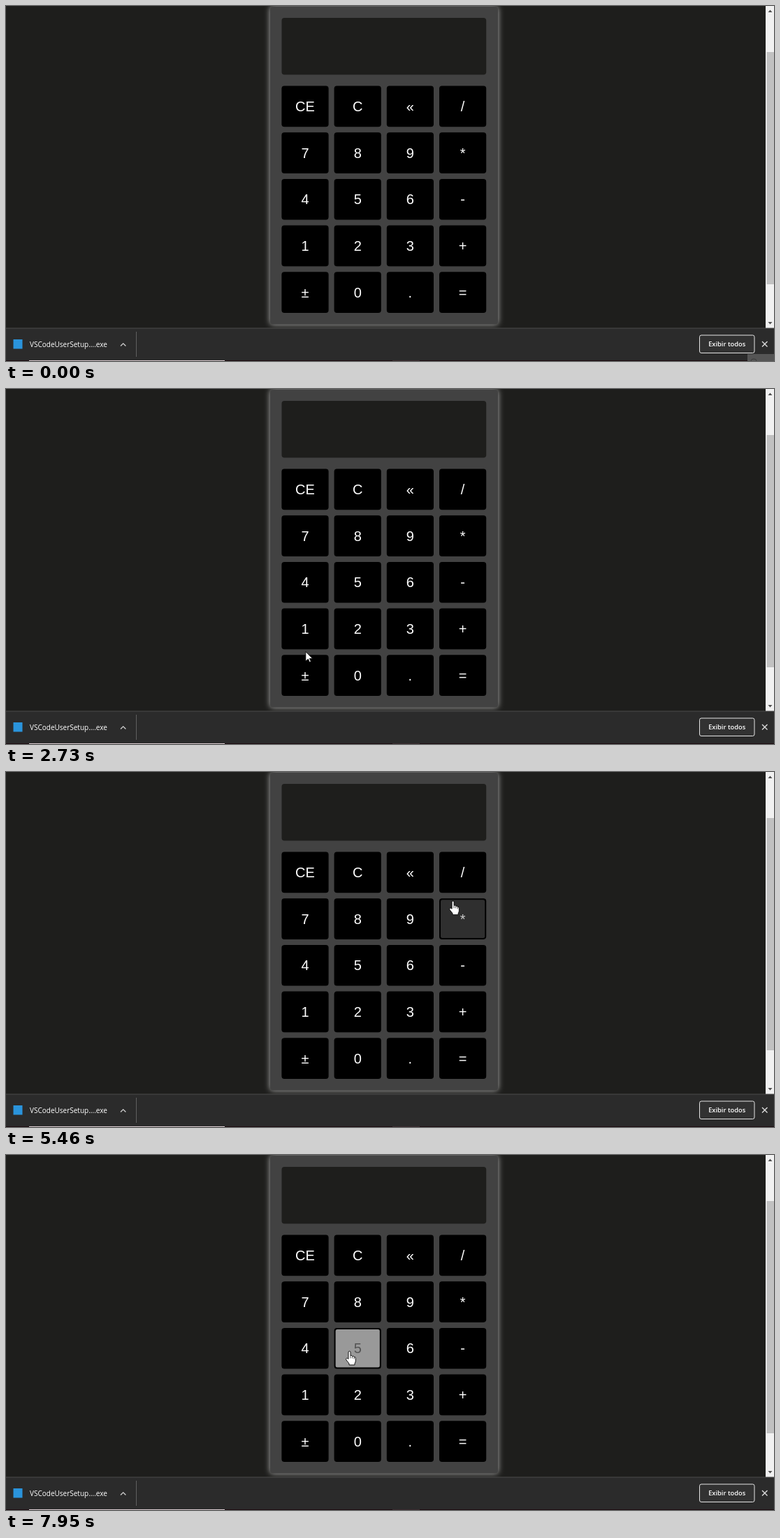
An HTML page that plays this animation: 1099x509 px, repeating every 8000 ms.

```html
<!DOCTYPE html>
<html lang="pt">
<head>
<meta charset="utf-8">
<title>Calculadora</title>
<style>
html, body { margin: 0; width: 100%; height: 100%; overflow: hidden; background: #1e1e1c; }
svg { display: block; width: 1099px; height: 509px; }
.key { font: 20px "Liberation Sans", Arial, sans-serif; text-anchor: middle; }
.ui { font-family: "Open Sans", "Noto Sans", sans-serif; fill: #fff; }
</style>
</head>
<body>
<svg id="stage" viewBox="0 0 1099 509">
  <defs>
    <filter id="glow" x="-10%" y="-10%" width="120%" height="120%"><feGaussianBlur stdDeviation="4.2"/></filter>
  </defs>
  <rect width="1099" height="509" fill="#1e1e1c"/>
  <rect x="378" y="1" width="326" height="455.5" rx="4" fill="#b4b4b4" filter="url(#glow)"/>
  <rect x="378" y="1" width="326" height="455.5" rx="4" fill="#424242"/>
  <rect x="394.5" y="17" width="292.7" height="81.5" rx="4" fill="#1e1e1c"/>
  <g id="keys"></g>

  <rect x="1087" width="12" height="462" fill="#f1f1f1"/>
  <rect x="1088.5" y="66" width="10.5" height="333" fill="#c1c1c1"/>
  <path d="M1090.5 9l3-3.5 3 3.5zM1090.5 453l3 3.5 3-3.5z" fill="#505050"/>

  <rect y="462" width="1099" height="47" fill="#2b2b2b"/>
  <rect y="461.5" width="1099" height="1" fill="#4d4d4d"/>
  <rect x="10.5" y="478" width="13" height="13.5" fill="#2a94dc"/>
  <text class="ui" x="34" y="489" font-size="10">VSCodeUserSetup....exe</text>
  <path d="M164 487.5l3.7-3.7 3.7 3.7" fill="none" stroke="#d0d0d0" stroke-width="1.3"/>
  <rect x="186" y="467" width="1" height="36" fill="#606060"/>
  <rect x="992.5" y="472" width="78.5" height="25.5" rx="2.5" fill="#323232" stroke="#e4e4e4"/>
  <text class="ui" x="1031.7" y="488" font-size="9.3" font-weight="600" text-anchor="middle">Exibir todos</text>
  <path d="M1082 481l7.5 7.5m0-7.5l-7.5 7.5" stroke="#dcdcdc" stroke-width="1.4"/>
  <rect y="508" width="1099" height="1" fill="#1c0b10"/>
  <rect x="33" y="508" width="280" height="1" fill="#dccdd2"/>
  <rect x="553" y="508" width="39" height="1" fill="#3a2a2e"/>
  <g id="tip">
    <rect x="1061" y="499" width="38" height="10" fill="#555"/>
    <path d="M1066 509q0-3 4-3t4 3" fill="none" stroke="#3a3a3a"/>
  </g>

  <path id="arrow" d="M.5 .5V14L4 11 6 15.5 8 14.6 6 10.3H10.3Z" fill="#fff" stroke="#000" stroke-width=".8"/>
  <g id="hand" stroke="#000" stroke-width=".9" stroke-linejoin="round">
    <path fill="#fff" d="M-2 11.5V2Q-2 .3-.5 .3T1 2V6.5Q3.3 5.8 3.7 7.6 5.8 6.8 6.2 8.6 8.3 8 8.3 10.5V14Q8.3 16 7 18V20H-1V18L-5 13Q-6 11-4.6 10.4-3.4 10-2 11.5Z"/>
    <path fill="none" stroke-width=".7" d="M1 6.5v4M3.7 7.6v3M6.2 8.6v3"/>
  </g>
</svg>
<script>
const LOOP = 8000, FADE = 500, APPEAR = 70;
const LEFT = 394.4, TOP = 114.5, COL = 75.2, ROW = 66.7, W = 67.2, H = 58.7;
const NS = "http://www.w3.org/2000/svg";
const byId = id => document.getElementById(id);

function add(parent, tag, attrs) {
  const el = document.createElementNS(NS, tag);
  for (const name in attrs) el.setAttribute(name, attrs[name]);
  return parent.appendChild(el);
}

const keys = "CE C « / 7 8 9 * 4 5 6 - 1 2 3 + ± 0 . =".split(" ").map((label, i) => {
  const x = LEFT + (i % 4) * COL;
  const y = TOP + Math.floor(i / 4) * ROW;
  const g = byId("keys");
  add(g, "rect", { x, y, width: W, height: H, rx: 4, fill: "#000" });
  const face = add(g, "rect", { x: x + 2, y: y + 2, width: W - 4, height: H - 4, rx: 2.5 });
  const text = add(g, "text", { class: "key", x: x + W / 2, y: y + 36.3 });
  text.textContent = label;
  return { face, text };
});

// Pointer waypoints: time, x, y
const path = [
  [70, 1010, 500], [430, 715, 424], [840, 715, 424], [1150, 660, 384],
  [1300, 655, 350], [1570, 634, 374], [1610, 625, 398], [1665, 611, 406],
  [2100, 555, 405], [2450, 454, 404], [2720, 427, 377], [3010, 463, 354],
  [3280, 519, 352], [3408, 544, 353], [3420, 573, 353], [3560, 621, 344],
  [3800, 640, 288], [4248, 537, 278], [4260, 518, 277], [4430, 465, 275],
  [4660, 422, 244], [4800, 424, 216], [4980, 465, 207], [5362, 619, 199],
  [5460, 640, 185], [5570, 648, 154], [5685, 613, 147], [6240, 465, 144],
  [6450, 428, 146], [6630, 432, 164], [6680, 435, 182], [6765, 468, 214],
  [7050, 522, 236], [7100, 523, 250], [7450, 572, 281], [7635, 539, 289],
  [7950, 492, 281]
];
const END = path[path.length - 1][0];

function pointerAt(time) {
  const t = Math.min(time, END - 0.01);
  const i = Math.max(1, path.findIndex(p => p[0] > t));
  const [t0, x0, y0] = path[i - 1], [t1, x1, y1] = path[i];
  const k = (t - t0) / (t1 - t0);
  return [x0 + (x1 - x0) * k, y0 + (y1 - y0) * k];
}

// Index of the key under the pointer, or -1
function keyAt(t) {
  if (t < APPEAR) return -1;
  const [px, py] = pointerAt(t);
  const x = px - LEFT, y = py - TOP;
  const col = Math.floor(x / COL), row = Math.floor(y / ROW);
  const inside = col >= 0 && col < 4 && row >= 0 && row < 5 && x - col * COL < W && y - row * ROW < H;
  return inside ? row * 4 + col : -1;
}

// How long the pointer has been on the key, capped at the fade time
function dwell(t, key) {
  let d = 0;
  while (d < FADE && keyAt(t - d - 4) === key) d += 4;
  return d;
}

const grey = v => `rgb(${[v, v, v].map(Math.round)})`;

function paint({ face, text }, k) {
  face.setAttribute("fill", grey(255 * k));
  text.setAttribute("fill", grey(255 - 285 * Math.min(k, 0.85)));
  text.setAttribute("font-weight", k > 0.5 ? 700 : 400);
}

const show = (id, on) => { byId(id).style.display = on ? "" : "none"; };

function draw(t) {
  const shown = t >= APPEAR;
  const hover = keyAt(t);
  const level = hover < 0 ? 0 : Math.min(1, dwell(t, hover) / FADE);
  keys.forEach((key, i) => paint(key, i === hover ? level : 0));
  show("tip", !shown);
  show("hand", shown && hover >= 0);
  show("arrow", shown && hover < 0);
  const [x, y] = pointerAt(Math.max(t, APPEAR));
  byId(hover < 0 ? "arrow" : "hand").setAttribute("transform", `translate(${x} ${y})`);
}

const start = performance.now();
function tick() {
  draw((performance.now() - start) % LOOP);
  requestAnimationFrame(tick);
}
tick();
</script>
</body>
</html>
```
